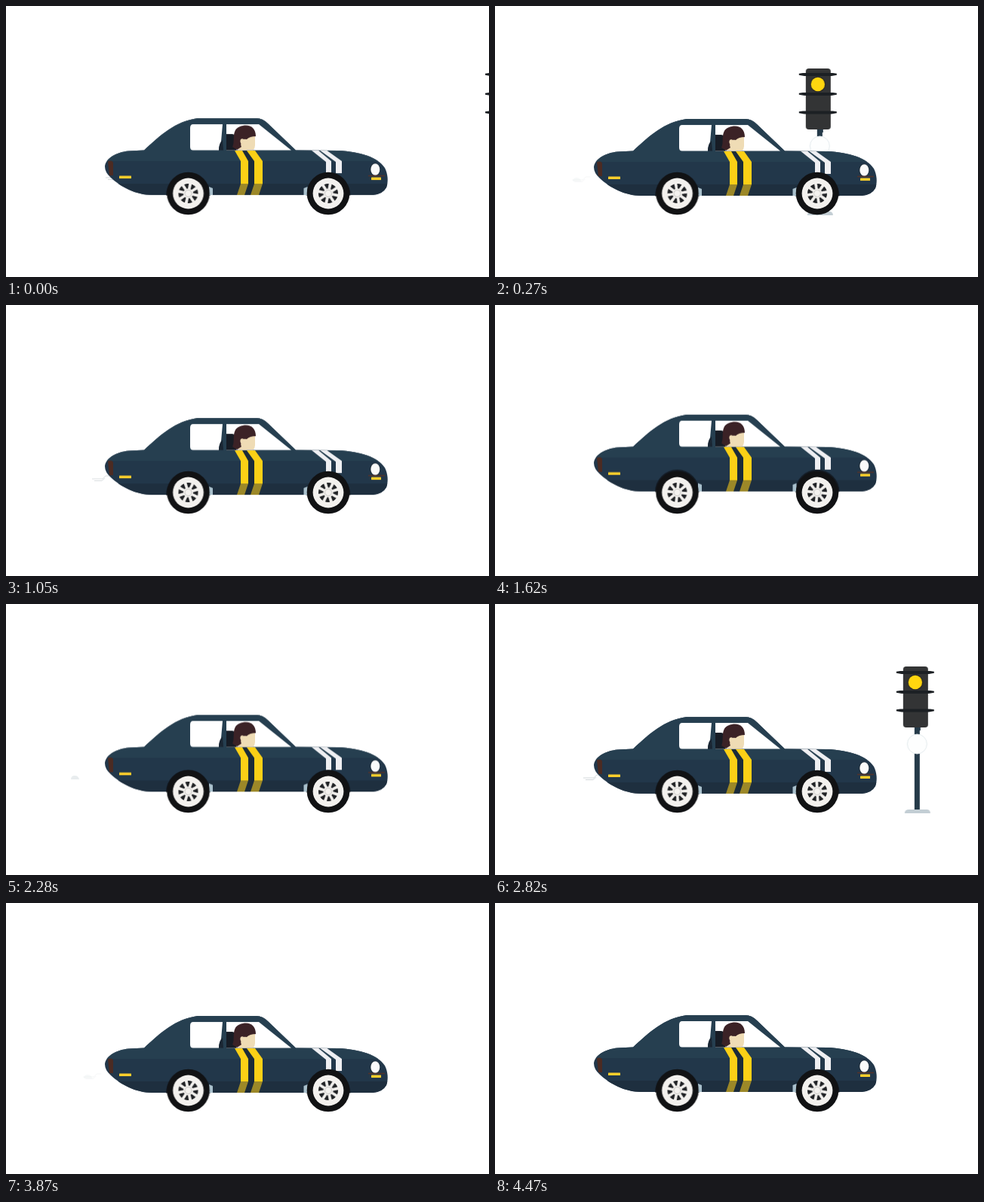
Recreate the animation shown at these times as an HTML page. Size 640 by 360 pixels, loop 4.5 s.

```html
<!DOCTYPE html>
<html lang="en">
<head>
<meta charset="utf-8">
<title>Car passing traffic lights</title>
<style>
  html, body { margin: 0; width: 100%; height: 100%; overflow: hidden; background: #fff; }
  svg { display: block; width: 100%; height: 100%; }

  .lamp { animation: pass 4500ms infinite; }
  @keyframes pass {
    0%   { transform: translateX(660px); animation-timing-function: steps(30); }
    20%  { transform: translateX(-114px); animation-timing-function: step-end; }
    60%  { transform: translateX(660px); animation-timing-function: steps(30); }
    80%, 100% { transform: translateX(-114px); }
  }

  .body { animation: bob 900ms cubic-bezier(.37, 0, .63, 1) infinite; }
  @keyframes bob {
    0%, 100% { transform: translateY(.1px); }
    20% { transform: translateY(1.2px); animation-timing-function: cubic-bezier(.7, 0, .75, 1); }
    70% { transform: translateY(-4.5px); }
  }

  .spin { animation: spin 900ms steps(30) infinite; }
  @keyframes spin { to { transform: rotate(360deg); } }

  .streak { animation: streak 900ms linear infinite; }
  @keyframes streak {
    0%    { transform: translate(132px, 228px); opacity: 1; }
    13.3% { transform: translate(117px, 231px); opacity: 1; }
    35%, 100% { transform: translate(98px, 231px); opacity: 0; }
  }

  .puff { animation: puff 900ms linear infinite; }
  @keyframes puff {
    0%, 20% { transform: translate(117px, 231px); opacity: 0; }
    45%     { transform: translate(95px, 231px); opacity: .8; }
    60%     { transform: translate(88px, 231px); opacity: 1; }
    70%     { transform: translate(86px, 229px); opacity: .3; }
    74%, 100% { transform: translate(85px, 229px); opacity: 0; }
  }
</style>
</head>
<body>
<svg viewBox="0 0 640 360" preserveAspectRatio="none">
  <defs>
    <path id="shell" d="M131 213C132 203 145 194 163 192.500L183 191.500C204 172 224 153 254 149H332Q340 149 347 156L384 191.500L440 192C470 193.500 493 201 502 215C506 223 507 233 504 241Q499 250 486 251H194C172 251 152 240 139 228Q131 221 131 213Z"/>
    <clipPath id="inShell"><use href="#shell"/></clipPath>
    <clipPath id="inWindow"><path d="M292 157H335L378 191.500H292Z"/></clipPath>
    <path id="spoke" d="M-2 -14L-1.500 0H1.500L2 -14Z"/>
    <g id="wheel">
      <circle r="28.300" fill="#111214"/>
      <circle r="20.400" fill="#f3f1ee"/>
      <circle r="13" fill="#202225"/>
      <g class="spin" fill="#f3f1ee">
        <use href="#spoke"/>
        <use href="#spoke" transform="rotate(45)"/>
        <use href="#spoke" transform="rotate(90)"/>
        <use href="#spoke" transform="rotate(135)"/>
        <use href="#spoke" transform="rotate(180)"/>
        <use href="#spoke" transform="rotate(225)"/>
        <use href="#spoke" transform="rotate(270)"/>
        <use href="#spoke" transform="rotate(315)"/>
        <circle r="6.500"/>
        <circle r="4.500" fill="none" stroke="#c9c7c4"/>
      </g>
    </g>
    <path id="visor" d="M-25 -1.200L-20 -2H20L25 -1.200V.8L18 2H-18L-25 .8Z"/>
    <path id="arch" d="M-29.500 0A29.500 29.500 0 0 1 29.500 0Z" fill="#141b24"/>
  </defs>

  <g class="lamp">
    <path d="M-14 278Q-14 273 -8 273H15Q20 273 20 278Z" fill="#c3ced4"/>
    <path d="M-1 160H7V168H6V273H-1Z" fill="#253a49"/>
    <circle cx="2.500" cy="186" r="13" fill="#fdfefe" stroke="#e3eaed"/>
    <rect x="-16" y="83" width="33" height="81" rx="4" fill="#333435"/>
    <circle cx="0" cy="104" r="10.300" fill="#272523"/>
    <circle cx="0" cy="104" r="9.200" fill="#ffd60f"/>
    <g fill="#1c2024">
      <use href="#visor" y="91"/>
      <use href="#visor" y="117"/>
      <use href="#visor" y="141.500"/>
    </g>
  </g>

  <path class="streak" d="M0 0H14L18 -4H24M3 2.500H13L17 -1" fill="none" stroke="#d3d8db"/>
  <path class="puff" d="M-5 2Q-5 -3 0 -3Q5 -3 6 2Z" fill="#e6ebed"/>

  <g class="body">
    <use href="#shell" fill="#22374a"/>
    <g clip-path="url(#inShell)">
      <path d="M120 140H520V206H120Z" fill="#263f50"/>
      <path d="M120 236H520V255H120Z" fill="#1e2f3f"/>
      <path d="M135 206Q142 204 142 209V225H137Z" fill="#4b2b23"/>
      <path d="M404 191H413L431 206V222H424V207ZM415 191H424L445 206V222H437V207Z" fill="#efeff2"/>
    </g>

    <path d="M248 157H287L285 180Q282 185 282 191.500H248Q244 191.500 244 187V162Q244 157 248 157Z" fill="#fff"/>
    <path d="M287 178L285 180Q282 185 282 191.500H288Z" fill="#1a2633"/>
    <path d="M292 157H335L378 191.500H292Z" fill="#fff"/>
    <g clip-path="url(#inWindow)">
      <path d="M292 170H300Q305 171 305 177V192H292Z" fill="#171c25"/>
      <path d="M307 192L311 175L330 171V185Q330 189 327 192Z" fill="#efdcb5"/>
      <path d="M300 187C304 181 298 165 309 160.500C321 155.500 331 160 331 173Q323 173 319 177Q315 176 313 178Q310 183 312 187L306 191Z" fill="#3b2226"/>
      <ellipse cx="313" cy="179.500" rx="2.600" ry="3.200" fill="#efdcb5"/>
    </g>

    <path d="M313 192H319L329 206V236L324 251H316L321 236V206Z" fill="#1b2b39"/>
    <path d="M303 192H313L321 206V236H311V206ZM319 192H330L340 206V236H329V206Z" fill="#fbd016"/>
    <path d="M311 236H321L316 251H306ZM329 236H340L335 251H324Z" fill="#9c8828"/>

    <ellipse cx="489" cy="217" rx="6.800" ry="8.600" fill="#1a2936"/>
    <ellipse cx="489.300" cy="217" rx="6" ry="7.800" fill="#fafafa"/>
    <path d="M480 225.500H502" stroke="#553329" stroke-width="1.500"/>
    <rect x="484" y="227.500" width="13" height="3.600" rx=".5" fill="#ffd02b"/>
    <rect x="150" y="225.500" width="16" height="3.500" rx=".5" fill="#ffd02b"/>

    <use href="#arch" x="241.500" y="251.500"/>
    <use href="#arch" x="427" y="251.500"/>
    <path d="M269 240L274 242V251H269ZM399.500 240L394.500 242V251H399.500Z" fill="#a9c0cc"/>
  </g>

  <use href="#wheel" x="241.500" y="249"/>
  <use href="#wheel" x="427" y="249"/>
</svg>
</body>
</html>
```
